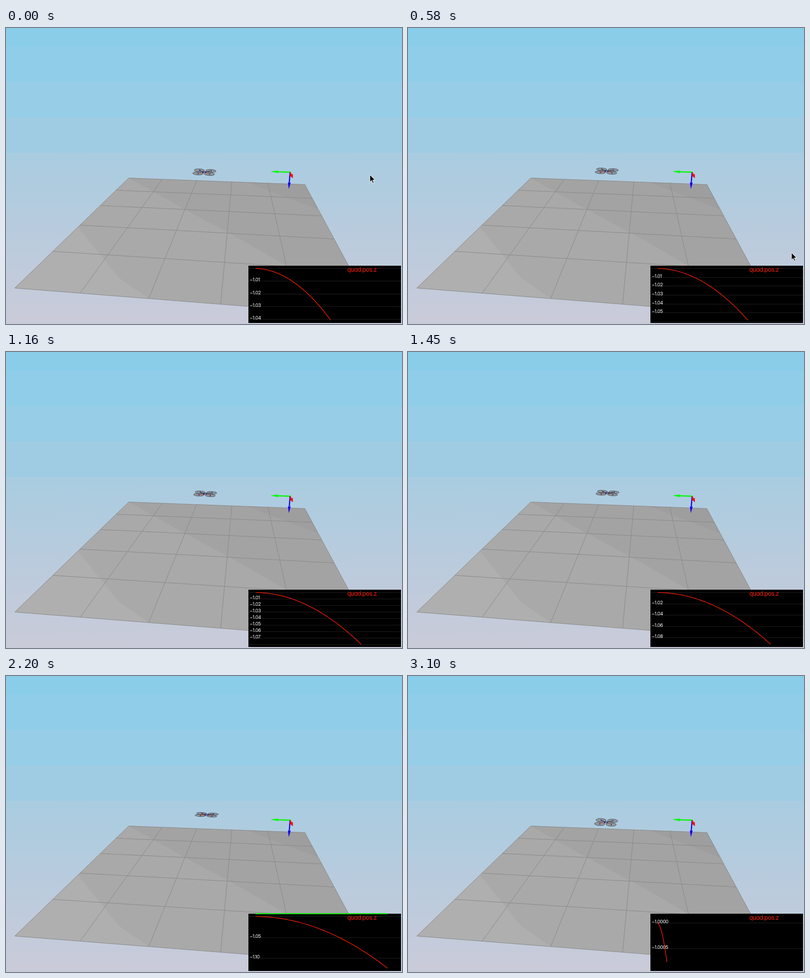
An HTML page with a canvas for the animation above (3.2 s loop, 789x589 px).

```html
<!DOCTYPE html>
<html lang="en">
<head>
<meta charset="utf-8">
<title>Quadcopter altitude</title>
<style>
html, body { margin: 0; width: 100%; height: 100%; overflow: hidden; background: #000; }
canvas { position: absolute; left: 0; top: 0; }
#title {
  position: absolute; left: 680px; top: 473px; color: #ff2008; white-space: nowrap;
  font: 400 12px/15px Inter, Roboto, sans-serif; font-feature-settings: "cv11";
  letter-spacing: -0.5px;
}
</style>
</head>
<body>
<canvas id="stage" width="789" height="589"></canvas>
<div id="title">quad.pos.z</div>
<script>
const W = 789, H = 589, LOOP = 3200, RESET = 19;
const ctx = document.getElementById('stage').getContext('2d');
const chart = { x: 483, y: 473, w: 304, h: 114, left: 497, mid: 529.5, span: 103 };

// The picture advances in steps, slightly slower in the second half.
const stepAt = ms => ms < 1600 ? Math.floor((ms + 6) / 145.3) : 11 + Math.floor((ms - 1600) / 150);
// Simulated time in chart pixels; the flight restarts at RESET.
const elapsed = k => k < RESET ? 150 + 7.55 * k : 0.8 + 9 * (k - RESET);
const rise = t => 1.76e-6 * t * (t + 4);

function poly(c, pts, fill) {
  c.beginPath();
  pts.forEach(([x, y]) => c.lineTo(x, y));
  c.closePath();
  c.fillStyle = fill;
  c.fill();
}

function line(c, [x1, y1], [x2, y2], color, width = 1) {
  c.beginPath();
  c.moveTo(x1, y1);
  c.lineTo(x2, y2);
  c.strokeStyle = color;
  c.lineWidth = width;
  c.stroke();
}

function arrow(c, from, to, color, head, half) {
  const dx = to[0] - from[0], dy = to[1] - from[1], len = Math.hypot(dx, dy);
  const ux = dx / len, uy = dy / len;
  const bx = to[0] - ux * head, by = to[1] - uy * head;
  line(c, from, [bx, by], color, 2.3);
  poly(c, [to, [bx - uy * half, by + ux * half], [bx + uy * half, by - ux * half]], color);
}

// Perspective map from the unit square to four corners.
function perspective([a, b, c, d]) {
  const [x1, y1] = [b[0] - c[0], b[1] - c[1]];
  const [x2, y2] = [d[0] - c[0], d[1] - c[1]];
  const [sx, sy] = [0, 1].map(i => a[i] - b[i] + c[i] - d[i]);
  const det = x1 * y2 - x2 * y1;
  const g = (sx * y2 - x2 * sy) / det, h = (x1 * sy - sx * y1) / det;
  return (u, v) => [0, 1].map(i =>
    (a[i] + u * (b[i] - a[i] + g * b[i]) + v * (d[i] - a[i] + h * d[i])) / (1 + g * u + h * v));
}

function drawSky(c) {
  const horizon = 248, top = [138, 205, 233], mid = [169, 204, 225];
  const g = c.createLinearGradient(0, horizon, 0, H);
  g.addColorStop(0, `rgb(${mid})`);
  g.addColorStop(1, '#cacbd9');
  c.fillStyle = g;
  c.fillRect(0, horizon, W, H - horizon);
  for (let y = -34; y < horizon; y += 70.5) {
    const f = Math.max(0, y) / horizon;
    c.fillStyle = `rgb(${top.map((v, i) => Math.round(v + (mid[i] - v) * f))})`;
    c.fillRect(0, Math.round(y), W, 71);
  }
}

function drawGround(c) {
  const corners = [[244.5, 298.5], [595.5, 311.5], [737, 574], [17.5, 517.5]];
  const at = perspective(corners);
  c.save();
  poly(c, corners, '#a9a9a9');
  c.clip();
  poly(c, [[244, 298], [340, 352], [470, 422], [558, 473], [740, 573], [740, 290]], '#a3a3a3');
  poly(c, [[478, 306], [622, 361], [600, 305]], '#9e9e9e');
  poly(c, [[142, 395], [225, 497], [285, 539], [0, 530]], '#afafaf');
  c.restore();
  for (let i = 0; i <= 1.01; i += 0.2) {
    line(c, at(0, i), at(1, i), '#8a8a8a');
    line(c, at(i, 0), at(i, 1), '#8a8a8a');
  }
}

function drawAxes(c) {
  arrow(c, [567, 287], [527, 285.5], '#00fa00', 15, 2.6);
  arrow(c, [566, 287], [563.5, 320.5], '#1400f5', 13, 2.8);
  arrow(c, [566, 287], [571.5, 299], '#f50500', 8, 3.6);
}

function makeScene() {
  const layer = document.createElement('canvas');
  layer.width = W;
  layer.height = H;
  const c = layer.getContext('2d');
  drawSky(c);
  drawGround(c);
  drawAxes(c);
  return layer;
}

function drawRotor(x, y, ry) {
  ctx.beginPath();
  ctx.ellipse(x, y, 10.2, ry, 0.05, 0, 7);
  ctx.fillStyle = '#929ba1';
  ctx.fill();
  ctx.strokeStyle = '#444a4e';
  ctx.lineWidth = 0.9;
  ctx.stroke();
}

function drawDrone(r) {
  const cx = 394.4 + 336 * r * r, cy = 291.3 - 100 * r - 180 * r * r;
  const dy = 3.7 - 14 * r, ry = 3.3 - 10 * r;
  for (const row of [-1, 1]) {
    for (const side of [-1, 1]) {
      const x = cx + 11.5 * side - 1.5 * row + 0.3, y = cy + dy * row + 0.6 * side;
      drawRotor(x, y, ry);
      line(ctx, [cx, cy], [x, y], row < 0 ? '#30344c' : '#e0542a', 1.1);
      ctx.fillStyle = '#16205c';
      ctx.fillRect(x - 1.5, y - 1, 3, 2);
      ctx.fillStyle = '#e4e8f4';
      ctx.fillRect(x - 1.5, y - 0.5, 1.2, 1);
    }
  }
  ctx.fillStyle = '#262c58';
  ctx.fillRect(cx - 4, cy - 1.6, 8, 3.4);
  ctx.fillStyle = '#7f8fe0';
  ctx.fillRect(cx - 1.5, cy - 0.5, 3.5, 2);
}

function tickStep(range) {
  const unit = 10 ** Math.floor(Math.log10(range) + 1e-9);
  const m = range / unit;
  return unit * (m < 2 ? 0.5 : m < 8 ? 1 : 2);
}

function drawChart(tEnd) {
  const { x, y, w, h, left, mid, span } = chart;
  const end = rise(tEnd), range = Math.max(0.001, end);
  const toY = r => mid + (r - end / 2) / range * span;
  const step = tickStep(range), digits = Math.ceil(-Math.log10(step) - 1e-9);
  ctx.fillStyle = '#000';
  ctx.fillRect(x, y, w, h);
  ctx.font = '400 9.5px Inter, Roboto, sans-serif';
  ctx.letterSpacing = '-0.5px';
  for (let i = -1; i < 12; i++) {
    const ty = Math.round(toY(i * step));
    if (ty < y || ty >= y + h) continue;
    ctx.fillStyle = '#1d1d1d';
    ctx.fillRect(x, ty, w, 1);
    if (ty < 485 || ty > 581) continue;
    ctx.fillStyle = '#fff';
    ctx.fillText('\u2212' + (1 + i * step).toFixed(digits), 485.5, ty + 0.5);
  }
  if (end > 0.1) {
    ctx.fillStyle = '#00f000';
    ctx.fillRect(left, 472, tEnd, 2);
  }
  ctx.beginPath();
  for (let i = 0; i <= 60; i++) {
    const t = tEnd * i / 60;
    ctx.lineTo(left + t, toY(rise(t)) + 0.5);
  }
  ctx.strokeStyle = '#ff2008';
  ctx.lineWidth = 1.2;
  ctx.stroke();
}

function drawCursor(k) {
  if (k > 5) return;
  const x = 725 + 9.75 * k, y = 292 + 38.75 * k;
  const shape = [[0, 0], [0, 14.5], [3.4, 11.4], [5.8, 16.8], [8, 15.8], [5.7, 10.6], [10.2, 10.4]];
  poly(ctx, shape.map(([a, b]) => [x + a, y + b]), '#000');
  ctx.strokeStyle = '#fff';
  ctx.lineWidth = 1;
  ctx.stroke();
}

const scene = makeScene();

function draw(now) {
  const k = stepAt(now % LOOP), t = elapsed(k);
  ctx.drawImage(scene, 0, 0);
  drawDrone(rise(t));
  drawChart(t);
  drawCursor(k);
}

const start = performance.now();
function tick() {
  draw(performance.now() - start);
  requestAnimationFrame(tick);
}
tick();
</script>
</body>
</html>
```
